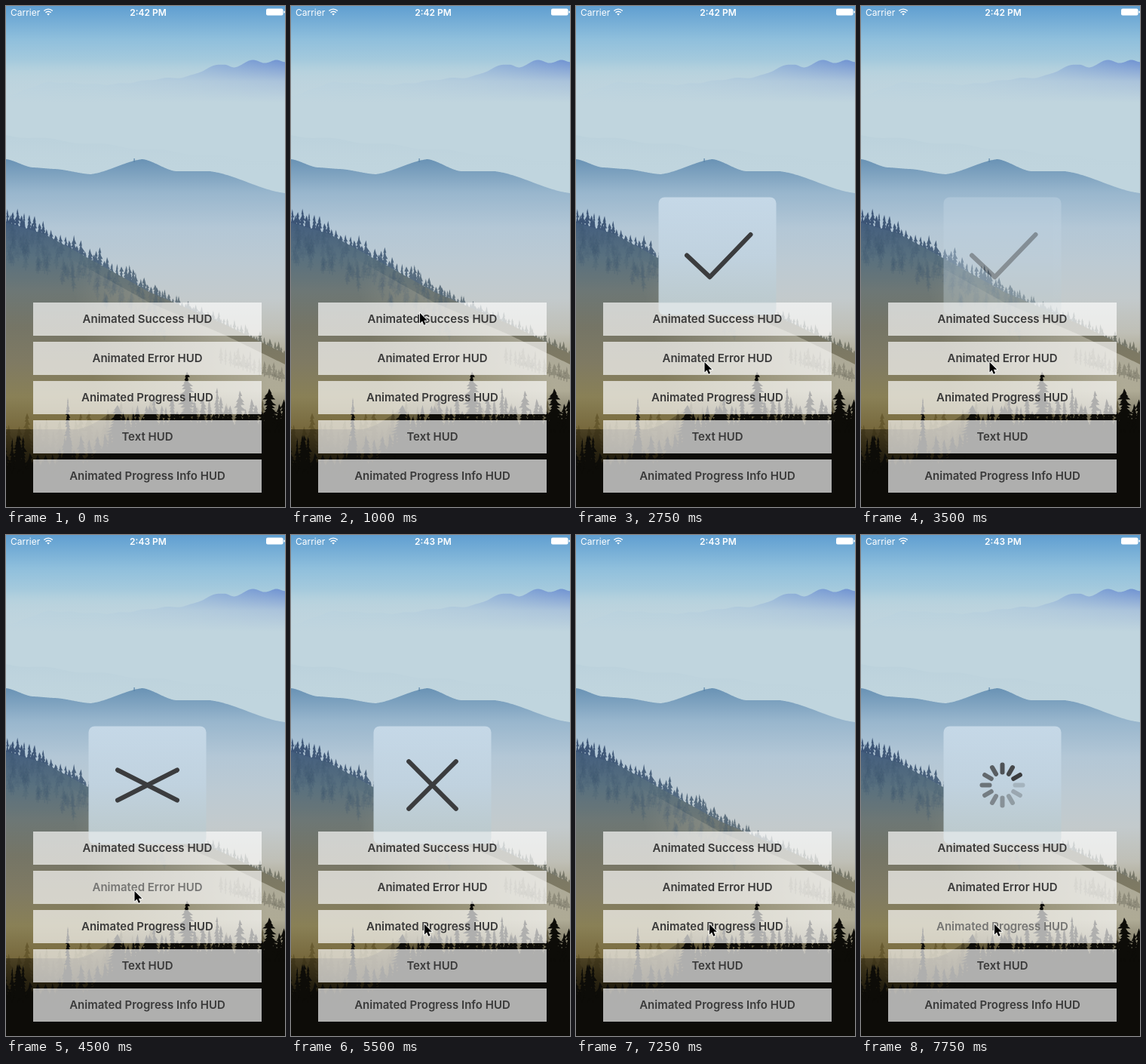
Write an HTML page with a canvas that moves like this. It is 370 px wide and 664 px high and loops after 8000 ms.

```html
<!DOCTYPE html>
<html lang="en">
<head>
<meta charset="utf-8">
<title>HUD demo</title>
<style>
html, body { margin: 0; width: 370px; height: 664px; overflow: hidden; background: #000; }
canvas, svg { position: absolute; left: 0; top: 0; display: block; }
text { font-family: Inter, Roboto, sans-serif; }
.label { font-size: 15px; font-weight: 600; text-anchor: middle; fill: #3a3a3a; }
.stroke { fill: none; stroke: #3b3c3e; stroke-width: 6; stroke-linecap: round; stroke-linejoin: round; }
</style>
</head>
<body>
<canvas id="scene" width="370" height="664"></canvas>
<svg width="370" height="664" viewBox="0 0 370 664">
  <defs>
    <linearGradient id="glass" x1="0" y1="0" x2="0" y2="1">
      <stop offset="0" stop-color="#c5d8e7"/>
      <stop offset=".5" stop-color="#c0d2df"/>
      <stop offset=".89" stop-color="#bccace"/>
      <stop offset=".9" stop-color="#dce3e5"/>
    </linearGradient>
  </defs>
  <g fill="#fff">
    <text x="6" y="13" font-size="12">Carrier</text>
    <text id="clock" x="188.5" y="13" font-size="12" font-weight="600" text-anchor="middle"></text>
    <rect x="345" y="3.5" width="22.5" height="9" rx="2"/>
    <rect x="368.3" y="6.5" width="1.5" height="3" rx=".7"/>
    <path d="M54.3 10.6a2.6 2.6 0 0 1 3.6 0L56.1 12.6z"/>
    <g fill="none" stroke="#fff" stroke-width="1.4">
      <path d="M52.5 8.8a5.1 5.1 0 0 1 7.2 0"/>
      <path d="M50.4 6.5a8.1 8.1 0 0 1 11.4 0"/>
    </g>
  </g>
  <g id="buttons"></g>
  <g id="hud">
    <rect x="109.5" y="253.5" width="156" height="156" rx="8" fill="url(#glass)"/>
    <path id="check" class="stroke" d="M147 330.5L177.5 359.2L231.5 303" pathLength="1"/>
    <g id="cross" transform="translate(187.5 331.5)">
      <path class="stroke" d="M-44.3 0H44.3"/>
      <path class="stroke" d="M-44.3 0H44.3"/>
    </g>
    <g id="spinner" transform="translate(187.5 331.5)"></g>
  </g>
  <g id="labels"></g>
  <path id="cursor" d="M0 0V13.4L3.1 10.5 5.3 15.8 7.6 14.8 5.4 9.7H9.8Z" stroke="#fff" stroke-width="1.6" paint-order="stroke"/>
</svg>
<script>
const $ = id => document.getElementById(id);
const c = $("scene").getContext("2d");
const W = 370, H = 664;

let seed = 11;
const rnd = () => (seed = (seed * 16807) % 2147483647) / 2147483647;
const between = (a, b) => a + (b - a) * rnd();
const clamp = v => Math.max(0, Math.min(1, v));
const ease = k => k * k * (3 - 2 * k);
const mix = (a, b, k) => a + (b - a) * k;

// Evenly spaced colours from y0 to y1
function vertical(y0, y1, ...colors) {
  const g = c.createLinearGradient(0, y0, 0, y1);
  colors.forEach((color, i) => g.addColorStop(i / (colors.length - 1), color));
  return g;
}

// Value of a curve through key points [x, ...values]
function along(keys, x, curve = ease) {
  const i = Math.max(1, keys.findIndex(k => k[0] >= x));
  const [a, b] = x > keys.at(-1)[0] ? [keys.at(-1), keys.at(-1)] : [keys[i - 1], keys[i]];
  const k = a === b ? 0 : curve(clamp((x - a[0]) / (b[0] - a[0])));
  return a.slice(1).map((v, j) => mix(v, b[j + 1], k));
}

function land(height, fill) {
  c.beginPath();
  c.moveTo(0, H);
  for (let x = 0; x <= W; x++) c.lineTo(x, height(x));
  c.lineTo(W, H);
  c.fillStyle = fill;
  c.fill();
}

// Ragged conifer standing on (x, y)
function pine(x, y, h, w, color) {
  const tiers = Math.max(4, Math.round(h / 4));
  c.fillStyle = color;
  c.beginPath();
  c.rect(x - .7, y - h, 1.4, h + 4);
  for (let i = 1; i <= tiers; i++) {
    const ty = y - h + i / tiers * h, half = w / 2 * Math.sqrt(i / tiers);
    c.moveTo(x, ty - h / tiers * 1.8);
    c.lineTo(x + half * between(.4, 1.2), ty);
    c.lineTo(x - half * between(.4, 1.2), ty);
  }
  c.fill();
}

// Row of pines along a ground line
function grove(x0, x1, gap, ground, height, width, color) {
  for (let x = x0; x < x1; x += gap * between(.6, 1.4))
    pine(x, ground(x), height * between(.5, 1.3), width * between(.7, 1.3), color);
}

function drawScene() {
  c.fillStyle = vertical(0, 220, "#609fd1", "#8fbfdc", "#b1d0dd", "#bfd5de", "#c3d6de", "#bfd2de");
  c.fillRect(0, 0, W, H);

  // Distant peaks
  const peaks = [[0, 118], [60, 101], [130, 104], [230, 95], [290, 77], [303, 82], [326, 71], [342, 76], [358, 71], [370, 75]];
  const far = c.createLinearGradient(0, 0, W, 0);
  ["#b0cfdf", "#a8cadd", "#91b3d8", "#7093d2"].forEach((color, i) => far.addColorStop(i / 3, color));
  land(x => along(peaks, x)[0] + Math.sin(x / 5) * .7, far);
  c.fillStyle = vertical(72, 128, "#bfd4de00", "#bfd4debb", "#c0d5de");
  c.fillRect(0, 72, W, H);
  land(x => 171 + x * .1 + Math.sin(x / 12) * 1.5, vertical(168, 225, "#b2cbd866", "#c2d5de00"));

  // Middle ridge
  const main = [[0, 203], [35, 214], [65, 216], [112, 223], [181, 203], [225, 219], [270, 219], [370, 248]];
  const mainY = x => along(main, x, k => mix(k, ease(k), .6))[0];
  land(mainY, vertical(200, 480, "#6690b3", "#98b6cd", "#b3c7d6", "#bccad3", "#c3cacc", "#bfbfb6", "#a49c80"));
  c.fillStyle = "#5a84a8";
  c.fillRect(169.5, 202, 1.2, 5);

  // Wooded slope
  const slope = [[0, 287], [50, 302], [100, 329], [190, 379], [290, 422], [370, 461]];
  const slopeY = x => along(slope, Math.max(0, x), k => k)[0];
  const tint = c.createLinearGradient(0, 290, W, 465);
  ["#3b5476", "#506880", "#6c7a80", "#787766"].forEach((color, i) => tint.addColorStop(i / 3, color));
  grove(-2, 200, 5, x => slopeY(x) + 5, 19, 9, tint);
  grove(200, W, 4, x => slopeY(x) + 5, 13, 8, tint);
  land(slopeY, vertical(285, 565, "#425d7e", "#58707f", "#6d7775", "#757566", "#7f7a63", "#898056", "#75663a"));
  for (let i = 0; i < 160; i++) {
    const x = rnd() * 210, depth = between(4, 52);
    pine(x, slopeY(x) + depth, between(8, 16), 9, "#39506a28");
  }
  const haze = c.createLinearGradient(110, 470, 330, 420);
  haze.addColorStop(0, "#b9b6a500");
  haze.addColorStop(1, "#b9b6a5cc");
  land(x => slopeY(x) + 14, haze);
  grove(285, W, 5, x => 470 + (x - 285) * .3, 17, 10, "#69675870");

  // Brown grove, then the black foreground, which climbs to the right
  grove(-3, 135, 10, () => 600, 50, 17, "#5d5026b0");
  grove(135, W, 9, () => 585, 50, 16, "#463d2090");
  const floorY = x => mix(606, 552, ease(clamp((x - 90) / 110)));
  const ink = "#0d0c08";
  land(x => floorY(x) - 45, vertical(510, 625, "#1c170a00", "#1c170a88", "#0b0905"));
  land(x => floorY(x) + Math.sin(x) * 3, ink);
  grove(-2, W, 8, x => floorY(x) + 10, 34, 15, ink);
  for (const [x, top, w] of [[17, 572, 22], [82, 522, 13], [148, 532, 34], [190, 533, 24],
    [240, 488, 30], [280, 509, 12], [310, 513, 22], [349, 510, 32]])
    pine(x, floorY(x) + 8, floorY(x) + 8 - top, w, ink);
}

function add(parent, tag, attrs, text = "") {
  const el = document.createElementNS("http://www.w3.org/2000/svg", tag);
  for (const k in attrs) el.setAttribute(k, attrs[k]);
  el.textContent = text;
  $(parent).append(el);
  return el;
}

const names = ["Success HUD", "Error HUD", "Progress HUD", "", "Progress Info HUD"];
const labels = names.map((name, i) => {
  const y = 393 + i * 52;
  add("buttons", "rect", { x: 36, y, width: 303, height: 44, fill: "#fff", "fill-opacity": .67 });
  return add("labels", "text", { x: 187.5, y: y + 27, class: "label" }, name ? "Animated " + name : "Text HUD");
});

// Twelve spokes, darkest just before three o'clock
for (let i = 0; i < 12; i++)
  add("spinner", "path", { class: "stroke", d: "M17 0H27", transform: `rotate(${i * 30})`,
    "stroke-opacity": .2 + .8 * i / 11 });

// Each HUD pops up as its button is pressed, and later fades away
const FRAME = 250, FADE = 850;
const shows = [
  { icon: "check", button: 0, start: 1250, fade: 3000 },
  { icon: "cross", button: 1, start: 4500, fade: 6250 },
  { icon: "spinner", button: 2, start: 7750, fade: 9500 }
];
const cursorKeys = [[250, 179, 228], [1000, 171, 407], [1250, 170, 409], [1750, 169.5, 468],
  [2250, 170.5, 472], [4750, 170.5, 472], [5500, 177, 516]];

function render(t) {
  const show = shows.findLast(s => t >= s.start);
  const age = show ? t - show.start : 0;
  $("hud").style.opacity = show ? clamp(1 - (t - show.fade) / FADE) : 0;
  for (const { icon } of shows) $(icon).style.display = show?.icon === icon ? "" : "none";
  $("check").style.strokeDasharray = clamp(.4 + age / 400) + " 2";
  const angle = mix(26.9, 45, clamp(age / FRAME));
  [...$("cross").children].forEach((bar, i) => bar.setAttribute("transform", `rotate(${i ? angle : -angle})`));
  labels.forEach((el, i) => el.style.fill = show?.button === i && age < FRAME ? "#757573" : "");
  $("cursor").style.display = t < FRAME ? "none" : "";
  $("cursor").setAttribute("transform", `translate(${along(cursorKeys, t)})`);
  $("clock").textContent = t < 4000 ? "2:42 PM" : "2:43 PM";
}

function tick() {
  const t = performance.now() % 8000;
  render(t - t % FRAME);
  requestAnimationFrame(tick);
}

drawScene();
tick();
</script>
</body>
</html>
```
